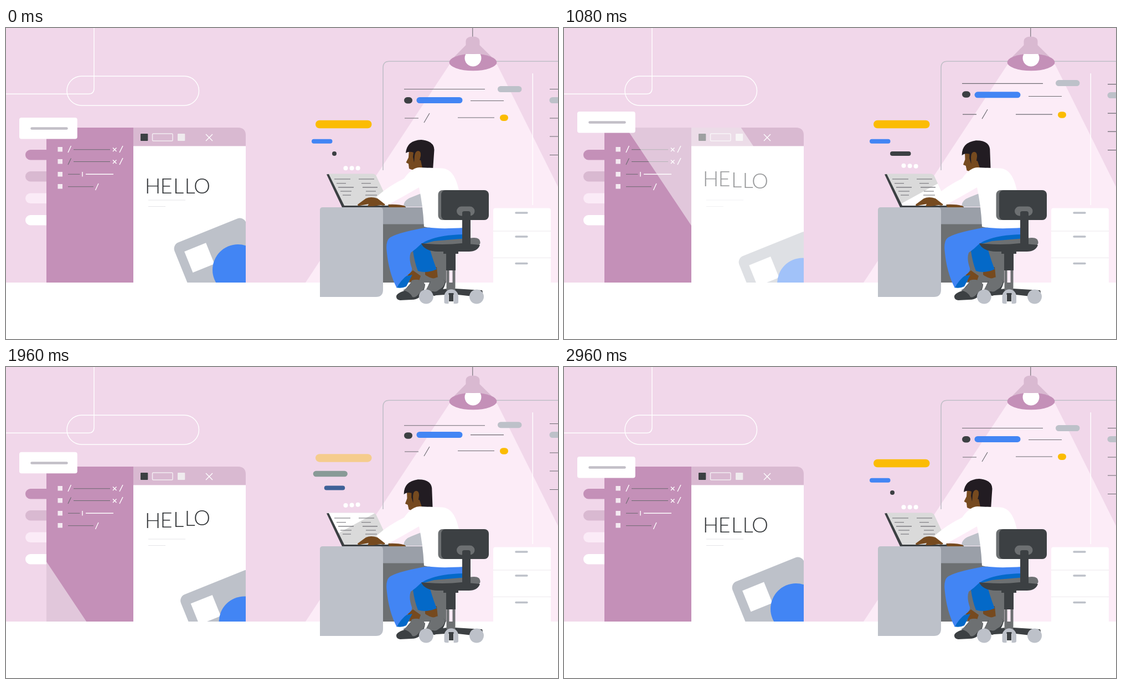
Animation of 997 by 562 pixels, one loop 3000 ms. Source, as an HTML page:

```html
<!DOCTYPE html>
<html lang="en">
<head>
<meta charset="utf-8">
<title>At the desk</title>
<style>
html, body { margin: 0; width: 100%; height: 100%; overflow: hidden; background: #fff }
svg { display: block; width: 100vw; height: 100vh }
.hello { font: 300 38px Lato, Inter, sans-serif; fill: #303336; text-anchor: middle }
.thin { fill: none; stroke: #6b6a70; stroke-width: 1.1 }
.white { fill: none; stroke: #fff; stroke-width: 1.4 }
.dark { fill: #3c4043 }
.mid { fill: #6d7072 }
.grey { fill: #bdc1c9 }
.skin { fill: #764a1f }
.blue { fill: #4285f4 }
.navy { fill: #0469c8 }
.plum { fill: #c490b8 }
.mauve { fill: #d9b9d1 }
</style>
</head>
<body>
<svg viewBox="0 0 997 562">
  <defs>
    <clipPath id="page"><path d="M230 213H433V460H230Z"/></clipPath>
    <clipPath id="window"><path d="M73 180H419Q433 180 433 194V460H73Z"/></clipPath>
    <clipPath id="screen"><path d="M581 263.500H662Q667 263.500 669 268L694 321H609Z"/></clipPath>
  </defs>
  <rect width="997" height="460" fill="#f1d7ea"/>
  <path fill="#fcecf7" d="M801 66H887L997 287V460H541Z"/>

  <!-- wall lines -->
  <path class="white" d="M0 119.300H149Q159 119.300 159 109V0"/>
  <rect class="white" x="110" y="87" width="238.500" height="53" rx="26.500"/>
  <path fill="none" stroke="#c0bfc7" stroke-width="1.600" d="M681 257V72Q681 60.300 692 60.300H997"/>
  <path class="white" d="M951.300 82V320"/>

  <!-- board notes -->
  <path class="thin" data-bob="800 -10.500" d="M719 110.500H865"/>
  <rect class="grey" data-bob="1000 -11" x="888" y="105" width="43.500" height="11" rx="5.500"/>
  <rect class="dark" data-bob="1200 -11" x="719" y="125" width="15" height="11.500" rx="5.700"/>
  <rect class="blue" data-bob="1400 -11" x="741.500" y="125" width="83" height="11" rx="5.500"/>
  <path class="thin" data-bob="1600 -10.500" d="M839 131.500H899"/>
  <path class="thin" data-bob="1800 -10.500" d="M720 163H745M755 171L765 154"/>
  <path class="thin" data-bob="2000 -10.500" d="M816 162H882"/>
  <rect fill="#fbbc04" data-bob="2150 -10.500" x="892" y="156.500" width="15" height="11.500" rx="5.700"/>
  <g data-bob="1450 -10.500">
    <path class="thin" d="M982 110.500H997M982 163H997M982 196H997M982 229.500H997"/>
    <rect class="grey" x="981.500" y="125" width="30" height="11" rx="5.500"/>
  </g>

  <!-- lamp -->
  <path class="thin" d="M842.800 0V18"/>
  <path class="mauve" d="M830.500 24Q831 15.500 843 15.500T855.500 24V31L886 61H801L830.500 31Z"/>
  <ellipse class="plum" cx="843.500" cy="62" rx="43" ry="15.300"/>
  <path fill="#fff" d="M830.500 47H856.500A15 15 0 1 1 830.500 47Z"/>

  <!-- window -->
  <rect class="plum" x="35" y="220" width="60" height="18.500" rx="9.200"/>
  <rect class="mauve" x="35" y="259" width="60" height="18.500" rx="9.200"/>
  <rect fill="#fbebf7" x="35" y="298.500" width="60" height="18.500" rx="9.200"/>
  <rect fill="#fff" x="35" y="338" width="60" height="18.500" rx="9.200"/>
  <g clip-path="url(#window)">
    <path class="plum" d="M73 180H230V460H73Z"/>
    <path class="mauve" d="M230 180H433V213.500H230Z"/>
    <path fill="#fff" d="M230 213.500H433V460H230Z"/>
    <path fill="#f4e9f1" d="M93.500 215h8.500v8.500h-8.500zm0 22h8.500v8.500h-8.500zm0 23h8.500v8.500h-8.500zm0 22h8.500v8.500h-8.500z"/>
    <path class="thin" d="M122 219.700H188M122 241.500H188M112 247L117.500 235.500M112 264.200H133.500M112 286.800H158"/>
    <path class="white" d="M112 225L117.500 213M205 225L211 213M193 216.500l6.500 6.500m0-6.500l-6.500 6.500M205 247L211 235M193 238.500l6.500 6.500m0-6.500l-6.500 6.500M138 260V268.500M144 264.200H194M161.500 293L167 281"/>
    <rect class="dark" x="243" y="191" width="13.300" height="13" rx="1"/>
    <rect fill="none" stroke="#f3edf2" stroke-width="1.500" x="264.500" y="191" width="36.500" height="13" rx="1.500"/>
    <rect fill="#efebee" x="310" y="191" width="13.300" height="13" rx="1"/>
    <path class="white" d="M361 192l12 12m0-12l-12 12"/>
    <path stroke="#e4e4e8" d="M257 311H324M257 322.500H288"/>
    <g class="hello" id="hello"></g>
    <g clip-path="url(#page)"><g data-bob="1500 30 14.700">
      <g transform="translate(300 392) rotate(-22)">
        <rect class="grey" width="139" height="200" rx="12"/>
        <rect fill="#fff" x="16" y="19.500" width="42" height="41"/>
      </g>
      <circle class="blue" cx="419" cy="437" r="46"/>
    </g></g>
    <path id="sheen" fill="#fff" opacity=".5"/>
  </g>
  <g data-bob="1320 -12">
    <rect fill="#fff" x="24" y="162" width="104.800" height="38.500" rx="4"/>
    <path stroke="#c2bfc7" stroke-width="4.500" stroke-linecap="round" d="M46.500 181.600H109.500"/>
  </g>

  <!-- message pills -->
  <rect id="leaving" fill="#fbbc04"/>
  <rect id="top"/>
  <rect id="middle"/>
  <rect id="fresh" class="dark"/>
  <g fill="#fff">
    <circle data-bob="1300 -5" cx="613.500" cy="253.300" r="4"/>
    <circle data-bob="1500 -5" cx="624.600" cy="253.300" r="4"/>
    <circle data-bob="1700 -5" cx="635.600" cy="253.300" r="4"/>
  </g>

  <!-- drawers -->
  <rect fill="#fff" x="880" y="325.500" width="104" height="150" rx="4"/>
  <path stroke="#ebe6ec" d="M880 367H984M880 415.300H984"/>
  <path stroke="#bdc1c9" stroke-width="3.400" stroke-linecap="round" d="M921 334H941M921 377H941M921 425.500H941"/>

  <!-- desk -->
  <path class="mid" d="M678 354H795V460H678Z"/>
  <path fill="#9a9fa8" d="M675 324H758V354.500H675Z"/>
  <path class="grey" d="M567 329Q567 324 572 324H675Q681 324 681 330V473Q681 486 668 486H567Z"/>

  <!-- chair base -->
  <path class="dark" d="M790 403H817V408H812V438H795V408H790ZM764 475L797 471H812L860 474Q864 484 852 486L816 482H793L762 484Z"/>
  <path class="mid" d="M795.500 438H811.500V474H795.500Z"/>
  <path fill="#fcecf7" d="M800.500 438H806.500V460H800.500Z"/>

  <!-- far leg -->
  <path class="skin" d="M757 436L778 432L780 453Q766 453 757 446Z"/>
  <path class="dark" d="M756 480L766 458Q790 447 794 460Q790 478 774 484Z"/>
  <path class="mid" d="M757 476L769 454Q778 450 786 449L793 458Q792 468 782 473Q776 478 772 476Z"/>
  <path class="navy" d="M735 403L750 385Q775 369 827 370V382L777 385L766 401Q773 425 778 436Q760 444 744 439Q738 424 735 403Z"/>

  <!-- near leg -->
  <path class="skin" d="M726 446L735 438L749 448L744 463L729 458Z"/>
  <path class="dark" d="M705 486Q704 480 719 475L734 457L757 463Q757 473 747 486Q742 491 732 491L712 492Q705 491 705 486Z"/>
  <path class="mid" d="M717 474Q728 469 733 456Q745 452 755 460Q760 469 746 480Q740 488 734 486Q729 476 717 474Z"/>
  <path class="navy" d="M705 469L715 450L734 446L723 467Q715 471 705 469Z"/>
  <path class="blue" d="M827 359L756 361Q702 371 692 380Q686 386 687.500 402Q691 442 706 470Q711 457 727 445Q734 440 733 434Q727 417 731 406Q741 399 750 390Q774 374 827 373Z"/>

  <!-- head -->
  <g id="head">
    <path class="skin" d="M728 220L727 234L722.500 243L727 245.500L728 254Q736 258 740 255L744 268H770L764 230L748 218Z"/>
    <path fill="#221c22" d="M722 226Q724 203 750 202Q773 204 773.500 220L771 257Q757 257 752 253L749 239Q742 237 737 243L735 233L736 225Q728 222 722 226Z"/>
    <path class="skin" d="M738 231Q739 222 745 222Q750 223 749 231L746 243L737 244Z"/>
  </g>

  <!-- laptop -->
  <path fill="#dadada" d="M581 263.500H662Q667 263.500 669 268L694 321H609Z"/>
  <path id="glare" fill="#fff" clip-path="url(#screen)"/>
  <path class="thin" d="M593 273H622M637 273H665M597 280.700H614M642 280.700H659M600 287.900H628M644 287.900H671M604 295H624M650 295H668M608 302H623M649 302H670"/>
  <path class="dark" d="M579 264.500L583 264L611 321H722V324H607Z"/>

  <!-- torso -->
  <path class="grey" d="M718 323Q718 311 732 306L752 298V323Z"/>
  <path class="skin" d="M690 319Q710 318 721 322V324H692Z"/>
  <path fill="#fff" d="M669 305Q692 285 719 272Q733 252 747 252L787 253.500C814 255 820 288 827 361Q775 364 755 359Q753 320 746 288Q715 306 687 321Q674 318 669 305Z"/>
  <path class="skin" d="M635 319L650 308Q659 304 671 308L685 319Q684 322 677 320L663 322H653L655 318L639 321Q635 322 635 319Z"/>

  <!-- chair -->
  <path class="mid" d="M773 385L845 379Q857 379 856.500 389L852 396L751 391Z"/>
  <path class="dark" d="M750 389Q790 393 823 389L856 392Q852 404 836 404H780Q755 403 750 389Z"/>
  <rect class="mid" x="780.500" y="293" width="40" height="54" rx="8"/>
  <rect class="dark" x="786" y="293" width="86" height="54" rx="8"/>
  <rect class="mid" x="814" y="322.500" width="32.500" height="17" rx="8.500"/>
  <path class="dark" d="M824 334Q824 331 828 331H835Q839 331 839 335V392H824Z"/>
  <circle class="grey" cx="758.800" cy="485.500" r="13"/>
  <circle class="grey" cx="850" cy="485.500" r="13"/>
  <path class="grey" d="M791.500 485A12.700 12.700 0 0 1 817 485V496Q816 499 808.500 498V479H799.500V498Q792 499 791.500 496Z"/>
  <path class="dark" d="M800 479H808V494H800Z"/>
</svg>
<script>
const LOOP = 3000;
const $ = id => document.getElementById(id);
const mix = (a, b, p) => a + (b - a) * p;
const ease = (t, from, to) => {
  const u = Math.min(1, Math.max(0, (t - from) / (to - from)));
  return (1 - Math.cos(Math.PI * u)) / 2;
};
// 0 at both ends of the loop, 1 at the peak
const bob = (t, peak) => t < peak ? ease(t, 0, peak) : 1 - ease(t, peak, LOOP);
const set = (el, attrs) => { for (const k in attrs) el.setAttribute(k, attrs[k]); };

$('hello').innerHTML = [265, 289.5, 311.5, 332, 354].map((x, i) =>
  `<text x="${x}" y="299.500" data-bob="${1100 + 175 * i} -14">${'HELLO'[i]}</text>`).join('');

const floaters = [...document.querySelectorAll('[data-bob]')].map(el =>
  [el, ...el.dataset.bob.split(' ').map(Number)]);

// x, centre y, width, height
const SLOTS = [[559, 174, 101.5, 14.5], [552, 204.8, 37.5, 8], [589, 227, 37.5, 8]];
const YELLOW = [251, 188, 4], BLUE = [66, 133, 244], DARK = [60, 64, 67];
const blend = (a, b, p) => a.map((v, i) => mix(v, b[i], p));

function pill(id, [x, cy, width, height], color) {
  set($(id), { x, y: cy - height / 2, width, height, rx: height / 2 });
  if (color) $(id).style.fill = `rgb(${color})`;
}

function pills(t) {
  const p = ease(t, 1560, 2500), out = ease(t, 1720, 2150);
  pill('leaving', [559, 174 - 16 * out, 101.5, 14.5]);
  $('leaving').style.opacity = t < 2500 ? 1 - out : 0;
  $('top').style.opacity = 1;
  pill('top', blend(SLOTS[1], SLOTS[0], p), blend(BLUE, YELLOW, p));
  pill('middle', blend(SLOTS[2], SLOTS[1], p), blend(DARK, BLUE, Math.min(1, p * 1.25)));
  // the dot pops in late, then widens as the next loop begins
  const size = 8 * ease(t, 2500, 2800);
  pill('fresh', [593 - size / 2, 227, size, size]);
  if (t < 1560) {
    const w = mix(8, 37.5, ease(t, 60, 600));
    pill('middle', [589, 227, w, 8], DARK);
  }
}

function draw(now) {
  const t = now % LOOP;
  for (const [el, peak, dy, dx = 0] of floaters) {
    const p = bob(t, peak);
    el.setAttribute('transform', `translate(${dx * p} ${dy * p})`);
  }
  pills(t);

  const nod = ease(t, 0, 800) - ease(t, 2000, 2960);
  set($('head'), { transform: `rotate(${-6 * nod} 760 260)` });

  // slanted light band: left edge accelerates, right edge eases after it
  const left = 440 - (Math.max(0, t - 226) / 47.2) ** 2;
  const right = 445 - 580 * ease(t, 450, 2500);
  const slant = 280 * .667;
  set($('sheen'), { d: `M${left} 180H${Math.max(left, right)}l${slant} 280H${left + slant}Z` });

  const upper = 350 - .115 * Math.max(0, t - 650);
  const lower = 350 - .0846 * Math.max(0, t - 1117);
  set($('glare'), { d: `M560 ${upper + 44}L720 ${upper - 44}V${lower - 44}L560 ${lower + 44}Z` });

  requestAnimationFrame(() => draw(performance.now()));
}
draw(0);
</script>
</body>
</html>
```
